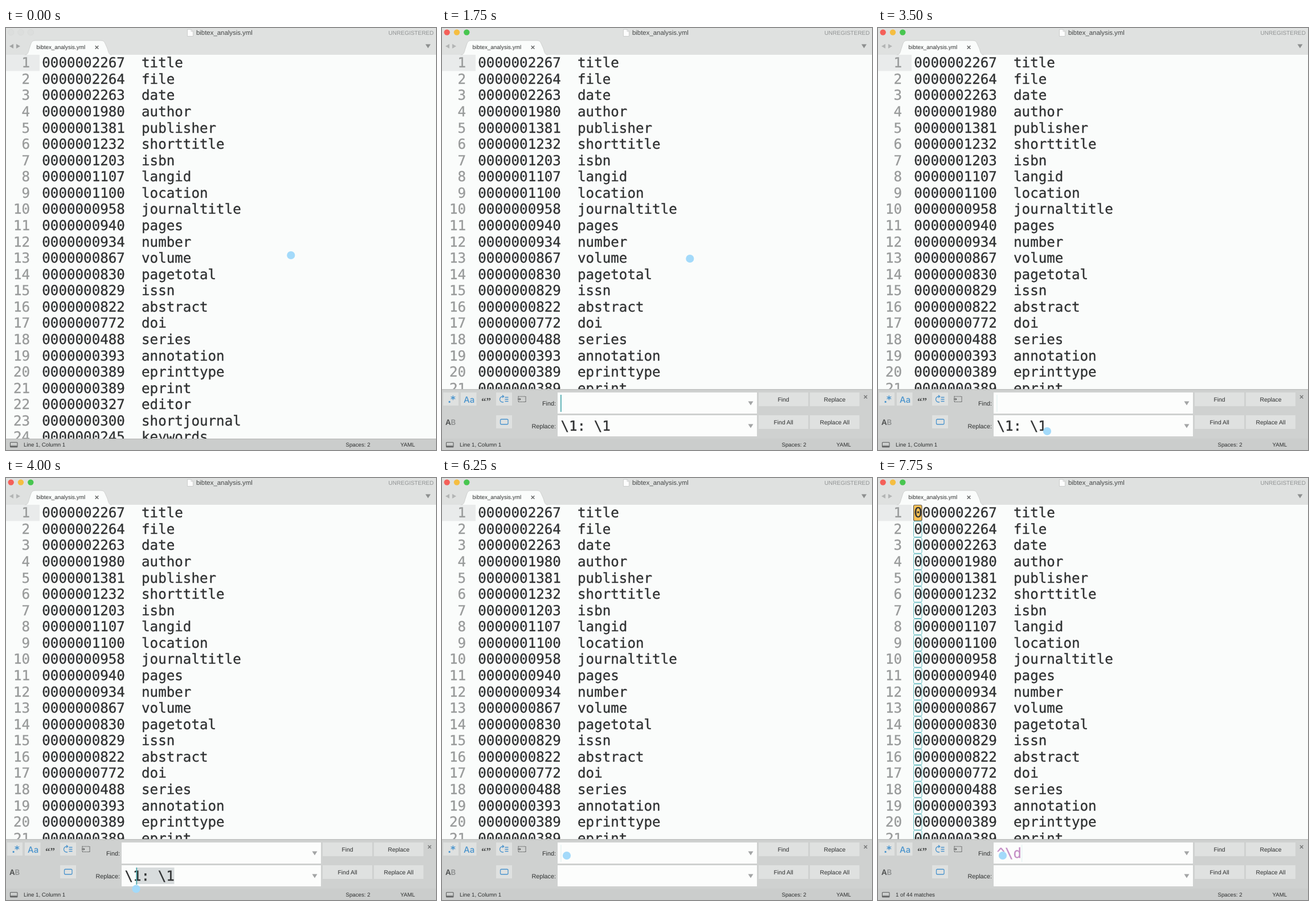
Recreate the animation shown at these times as an HTML page. Size 755 px wide and 741 px high, loop 8000 ms.

```html
<!DOCTYPE html>
<html lang="en">
<head>
<meta charset="utf-8">
<title>Regex search in an editor</title>
<style>
html, body { margin: 0; width: 100%; height: 100%; overflow: hidden; background: #fafcfb; }
svg { display: block; }
text { white-space: pre; text-rendering: geometricPrecision; }
.code { font: 24.2px "DejaVu Sans Mono", monospace; fill: #303233; stroke: #303233; stroke-width: .35; }
.num { fill: #989a9a; stroke: #989a9a; text-anchor: end; }
.ui { font: 9.7px "Liberation Sans", Arial, sans-serif; fill: #2e3030; }
.mid { text-anchor: middle; }
.end { text-anchor: end; }
</style>
</head>
<body>
<svg id="stage" width="755" height="741" viewBox="0 0 755 741">
  <rect width="755" height="741" fill="#fafcfb"/>
  <rect y="47" width="59" height="28.5" fill="#e9ebeb"/>
  <g id="marks"></g>
  <g id="rows"></g>
  <rect id="mainCaret" x="62" y="48" width="1.5" height="27" fill="#4aa9ad"/>

  <rect width="755" height="47" fill="#dfe1e0"/>
  <path d="M33 47 C39 47 39 42 41 36 L44 27 Q46 22 51 22 H167 Q172 22 174 27 L178 36 C180 42 180 47 186 47" fill="#fafcfb" stroke="#c9cbca" stroke-width=".8"/>
  <g id="lights" stroke-width=".6"></g>
  <path d="M318.5 2.5 H325 L328.5 6 V14.5 H318.5 Z" fill="#fdfdfd" stroke="#c3c5c5" stroke-width=".8"/>
  <path d="M325 2.5 V6 H328.5" fill="none" stroke="#c3c5c5" stroke-width=".8"/>
  <text class="ui" x="334" y="12" style="font-size:11.4px;fill:#454747">bibtex_analysis.yml</text>
  <text class="ui end" x="751" y="12" style="font-size:10px;fill:#909292">UNREGISTERED</text>
  <path id="arrows" d="M13 28 V36 L6 32 Z M18 28 V36 L25 32 Z"/>
  <text class="ui" x="53.5" y="37" style="font-size:9.9px">bibtex_analysis.yml</text>
  <path d="M156.7 31.2 l5.6 5.6 m0 -5.6 l-5.6 5.6" stroke="#666868" stroke-width="1.5"/>
  <path d="M736.5 28.5 H745.5 L741 35.5 Z" fill="#8d8f8f"/>

  <g id="panel">
    <rect y="634" width="755" height="90" fill="#cfd1d0"/>
    <rect y="634" width="755" height="1.5" fill="#bfc1c0"/>
    <g id="buttons" fill="#dfe1e0"></g>
    <g fill="#fcfdfc">
      <rect x="203" y="640" width="350" height="37"/>
      <rect x="203" y="680" width="350" height="37"/>
    </g>
    <path d="M537.5 655.5 h9 l-4.5 7 Z M537.5 695.5 h9 l-4.5 7 Z" fill="#a3a5a5"/>
    <text class="ui end" x="200" y="663" style="font-size:10.8px">Find:</text>
    <text class="ui end" x="200" y="703" style="font-size:10.8px">Replace:</text>
    <path d="M741 645 l5.4 5.4 m0 -5.4 l-5.4 5.4" stroke="#737575" stroke-width="1.4"/>
    <g fill="#4a94cd">
      <text x="8" y="658" style="font:bold 17px 'DejaVu Sans Mono',monospace;letter-spacing:-4px">.*</text>
      <text x="38" y="657.5" style="font:500 15px Inter,sans-serif">Aa</text>
    </g>
    <text x="69" y="661" style="font:bold 17px 'Liberation Serif',serif" fill="#4c4e4e">“”</text>
    <g fill="none" stroke="#4a94cd" stroke-width="1.3">
      <path d="M108 647 H106.5 a5 5 0 0 0 0 10 H108 M106 644.8 l2.6 2.2 l-2.6 2.2 M110.5 648.5 h6 M110.5 652 h6 M110.5 655.5 h6"/>
      <rect x="102.5" y="687" width="13.5" height="9" rx="2"/>
    </g>
    <rect x="134" y="647" width="13" height="9.5" fill="none" stroke="#4c4e4e" stroke-width="1.2" stroke-dasharray="1.6 1"/>
    <path d="M133 651.8 h5 m-2 -2 l2 2 l-2 2" fill="none" stroke="#4c4e4e"/>
    <text x="6" y="697" style="font:600 13.2px Inter,sans-serif" fill="#4c4e4e">A<tspan fill="#8f9191">B</tspan></text>
    <rect id="selection" y="684" height="29" fill="#d8dcdd"/>
    <text id="find" class="code" x="208.5" y="667" style="fill:#c58fc6;stroke:#c58fc6"></text>
    <text id="replace" class="code" x="208.5" y="706.5"></text>
    <rect id="caret" width="1.7" height="30" fill="#4aa9ad"/>
  </g>

  <rect y="721" width="755" height="20" fill="#cbcdcc"/>
  <rect id="statusEdge" y="721" width="755" height="1.2" fill="#b9bbba"/>
  <rect x="7.5" y="727.5" width="12.5" height="8.5" rx="1" fill="none" stroke="#5d5f5f" stroke-width="1.1"/>
  <rect x="8" y="733.5" width="11.5" height="2.2" fill="#5d5f5f"/>
  <text id="status" class="ui" x="31" y="735"></text>
  <text class="ui" x="596.5" y="735">Spaces: 2</text>
  <text class="ui" x="692.5" y="735">YAML</text>
  <circle id="pointer"/>
</svg>
<script>
const $ = id => document.getElementById(id);
const LOOP = 8000, STEP = 250, PITCH = 28.57, ADV = 14.57;

const fields = `2267 title,2264 file,2263 date,1980 author,1381 publisher,1232 shorttitle,
1203 isbn,1107 langid,1100 location,958 journaltitle,940 pages,934 number,867 volume,
830 pagetotal,829 issn,822 abstract,772 doi,488 series,393 annotation,389 eprinttype,
389 eprint,327 editor,300 shortjournal,245 keywords`.split(",").map(s => s.trim().split(" "));

$("rows").innerHTML = fields.map(([count, name], i) => {
  const y = 69.3 + i * PITCH;
  return `<text class="code num" x="42" y="${y}">${i + 1}</text>` +
    `<text class="code" x="63.3" y="${y}">${count.padStart(10, "0")}  ${name}</text>`;
}).join("");

$("marks").innerHTML = fields.map((_, i) =>
  `<rect x="62.5" y="${47.5 + i * PITCH}" width="14.5" height="${PITCH - 1}" rx="2" ` +
  (i ? `fill="none" stroke="#62bcc2"/>` : `fill="#fbc255" stroke="#5b564b" stroke-width="1.2"/>`)
).join("");

$("lights").innerHTML = [8.7, 26, 43.3].map(x => `<circle cx="${x}" cy="7.6" r="5.2"/>`).join("");
const lights = [...$("lights").children];

const box = (x, y, w, h) => `<rect x="${x}" y="${y}" width="${w}" height="${h}"/>`;
const button = (x, y, label) => box(x, y, 87, 24) +
  `<text class="ui mid" x="${x + 43.5}" y="${y + 15.7}" style="font-size:10.4px">${label}</text>`;
$("buttons").innerHTML =
  button(556, 640, "Find") + button(646, 640, "Replace") +
  button(556, 680, "Find All") + button(646, 680, "Replace All") +
  box(2, 640, 27, 23) + box(33, 640, 27.5, 23) + box(95, 640, 28, 23) + box(95, 680, 28, 23);

// time, x, y
const path = [
  [0, 500.3, 399], [250, 500.3, 399], [1000, 435.3, 405], [2500, 435.3, 405], [3500, 297, 708],
  [3750, 289, 727], [4250, 168, 716], [4500, 185, 702], [4750, 215.5, 680.5],
  [5000, 215.5, 680.5], [5500, 219, 663], [LOOP, 219, 663]
];

function pointerAt(t) {
  const i = path.findIndex(p => p[0] > t);
  const [t0, x0, y0] = path[i - 1], [t1, x1, y1] = path[i];
  const u = (t - t0) / (t1 - t0), e = u * u * (3 - 2 * u);
  return [x0 + (x1 - x0) * e, y0 + (y1 - y0) * e];
}

const set = (el, attrs) => { for (const k in attrs) el.setAttribute(k, attrs[k]); };
const show = (el, on) => el.setAttribute("visibility", on ? "visible" : "hidden");
const blink = (t, since) => (t - since) % 1000 < 500 ? 1 : 0.1;

function render(now) {
  const t = Math.floor(now % LOOP / STEP) * STEP;
  const focused = t >= 1000, open = t >= 1750;
  const typed = t < 6500 ? 0 : t < 7000 ? 1 : t < 7250 ? 2 : 3;
  const found = typed === 3;

  const on = ["#f4605a", "#f5be42", "#48c650"];
  lights.forEach((c, i) => set(c, {
    fill: focused ? on[i] : "#dcdedd", stroke: focused ? "none" : "#d3d5d4"
  }));
  set($("arrows"), { fill: focused ? "#b3b5b5" : "#a2a4a4" });
  set($("mainCaret"), { opacity: blink(t, 1000) });
  show($("mainCaret"), focused && !open);
  show($("marks"), found);
  show($("panel"), open);
  show($("statusEdge"), !open);
  $("status").textContent = found ? "1 of 44 matches" : "Line 1, Column 1";

  $("find").textContent = "^\\d".slice(0, typed);
  $("replace").textContent = t < 4500 ? "\\1: \\1" : "";

  const [x, y] = pointerAt(t);
  const dragging = t >= 4000 && t < 4500;
  const inReplace = t >= 3750 && t < 4750;
  const left = Math.max(208, x), right = 208 + 6 * ADV;
  set($("selection"), { x: left, width: right - left });
  show($("selection"), open && dragging);

  let cx = 208 + typed * ADV, since = 1750;
  if (inReplace) {
    cx = dragging ? left : t < 4000 ? right : 208;
    since = t;
  } else if (t >= 7250) since = 7250;
  else if (t >= 6500) since = t;
  else if (t >= 4750) since = 4750;
  set($("caret"), { x: cx, y: inReplace ? 684 : 644, opacity: blink(t, since) });

  const pressed = t === 1000 || t === 4750;
  set($("pointer"), {
    cx: x, cy: y, r: pressed ? 8.2 : 7.1,
    fill: pressed ? "none" : "#a3dafa", stroke: pressed ? "#b9dcf1" : "none"
  });
}

function frame(now) {
  render(now);
  requestAnimationFrame(frame);
}
render(0);
requestAnimationFrame(frame);
</script>
</body>
</html>
```
